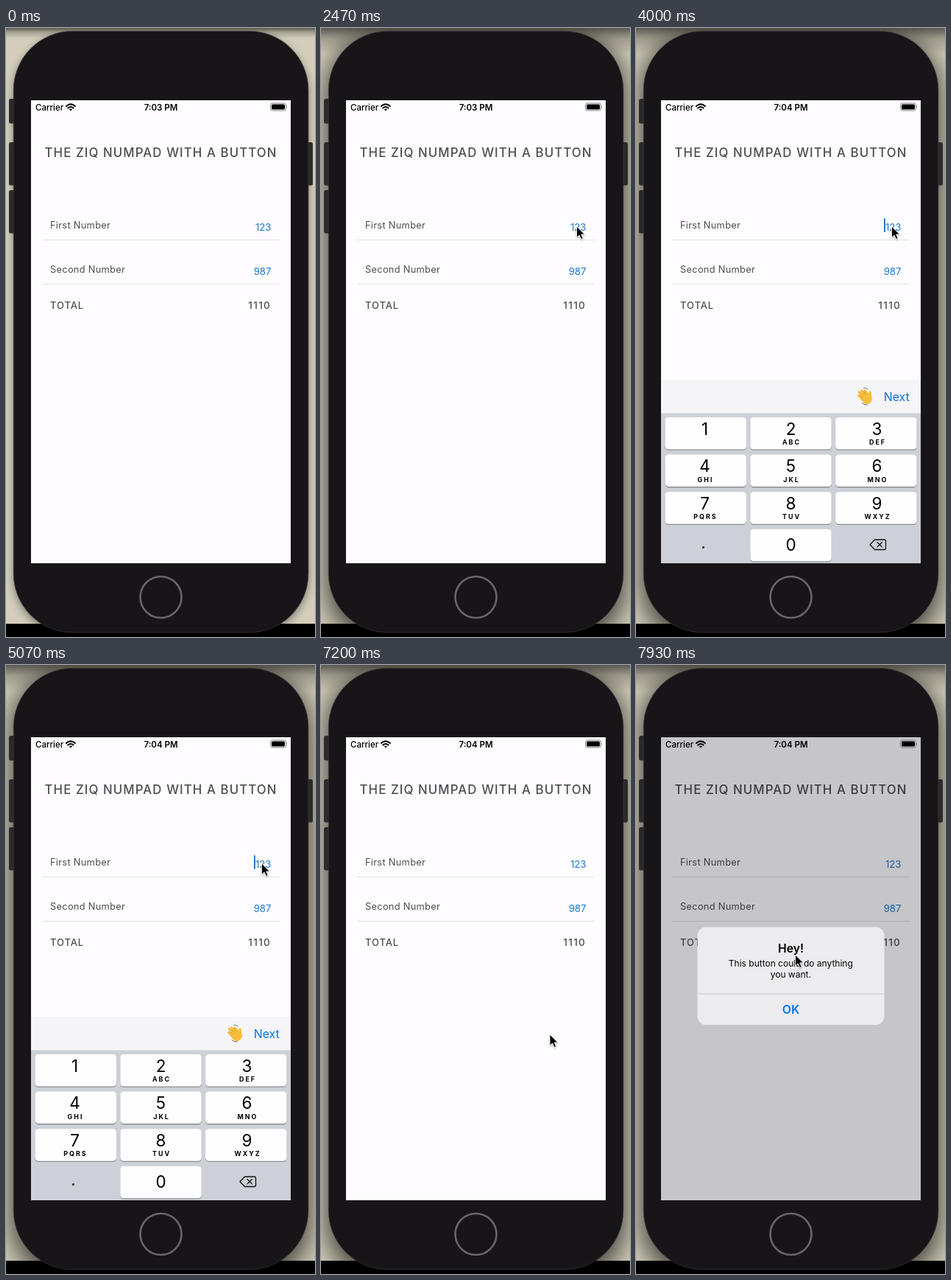
Write an HTML page that moves like this. It is 420 by 826 pixels and loops after 8000 ms.

```html
<!DOCTYPE html>
<html lang="en">
<head>
<meta charset="utf-8">
<title>Numpad with a button</title>
<style>
html, body { margin: 0; width: 100%; height: 100%; overflow: hidden; background: #000; }
svg { display: block; width: 100%; height: 100%; font-family: Inter, Roboto, sans-serif; }
.mid { text-anchor: middle; }
.ink { fill: #4f4d53; }
.link { fill: #1a78cf; font-size: 13.2px; }
.label { font-size: 12.8px; letter-spacing: .3px; }
.total { font-size: 13px; font-weight: 500; letter-spacing: .9px; }
.digit { font-size: 22.5px; }
.letters { font-size: 8.9px; font-weight: 700; letter-spacing: 2px; }
.line { fill: none; stroke-linecap: round; stroke-linejoin: round; }
</style>
</head>
<body>
<svg viewBox="0 0 420 826">
  <defs>
    <linearGradient id="topShade" x1="0" y1="0" x2="0" y2="1">
      <stop offset="0" stop-color="#34322e" stop-opacity=".75"/>
      <stop offset=".4" stop-color="#34322e" stop-opacity=".3"/>
      <stop offset="1" stop-color="#34322e" stop-opacity="0"/>
    </linearGradient>
    <filter id="soft" x="-20%" y="-20%" width="140%" height="140%"><feGaussianBlur stdDeviation="6"/></filter>
    <filter id="wide" x="-20%" y="-20%" width="140%" height="140%"><feGaussianBlur stdDeviation="17"/></filter>
    <filter id="pointerShade" x="-50%" y="-50%" width="200%" height="200%">
      <feDropShadow dx="0" dy="1" stdDeviation=".9" flood-opacity=".35"/>
    </filter>
    <clipPath id="desk"><rect width="420" height="808"/></clipPath>
    <clipPath id="screen"><rect x="34" y="98" width="353" height="628"/></clipPath>
  </defs>

  <rect width="420" height="826"/>
  <g clip-path="url(#desk)">
    <rect width="420" height="808" fill="#d3cebb"/>
    <rect id="idleShade" x="10" y="8" width="401" height="816" rx="80" opacity=".42" filter="url(#soft)"/>
    <rect id="activeShade" x="7" y="6" width="407" height="830" rx="80" opacity=".68" filter="url(#wide)"/>
    <rect id="topEdge" width="420" fill="url(#topShade)"/>
  </g>

  <g fill="#2a292c">
    <rect x="4" y="96" width="9" height="33.500" rx="2.500"/>
    <rect x="4" y="155" width="9" height="58.500" rx="2.500"/>
    <rect x="4" y="220" width="9" height="58.500" rx="2.500"/>
    <rect x="408" y="155" width="9" height="58.500" rx="2.500"/>
  </g>
  <rect x="10.300" y="4.300" width="400.600" height="815.600" rx="80" fill="#171518" stroke="#39383b" stroke-width=".7"/>
  <circle cx="210.500" cy="772" r="28" fill="#171518" stroke="#676669" stroke-width="2.600"/>

  <g clip-path="url(#screen)">
    <rect x="34" y="98" width="353" height="628" fill="#fefcff"/>
    <text class="ink" x="52.500" y="175" font-size="16.800" font-weight="500" letter-spacing="1.100">THE ZIQ NUMPAD WITH A BUTTON</text>
    <text class="ink label" x="60" y="272">First Number</text>
    <text class="ink label" x="60" y="332">Second Number</text>
    <text class="ink total" x="60" y="381">TOTAL</text>
    <text class="ink total" x="360.200" y="381" text-anchor="end" style="font-size:13.600px;letter-spacing:1.300px">1110</text>
    <text class="link" x="360.500" y="275" text-anchor="end">123</text>
    <text class="link" x="360.500" y="335" text-anchor="end">987</text>
    <path d="M49 287.500H372M49 347.500H372" stroke="#e2e0e6"/>
    <rect id="caret" x="337" y="258" width="1.800" height="19" rx=".8" fill="#2464bd"/>

    <g id="keyboard">
      <rect x="34" y="477" width="353" height="46" fill="#f5f4f7"/>
      <rect x="34" y="522.500" width="353" height="210" fill="#cdd0d7"/>
      <text x="336.700" y="506" font-size="15.900" fill="#0a74e4">Next</text>
      <g class="line" transform="translate(311 500.500) rotate(-42) scale(1.18)" stroke="#f7bd3c">
        <path d="M-4 2V-6M-1 0V-8.500M2 0V-8M4.700 2V-5.500" stroke-width="2.700"/>
        <path d="M-3.800 1H4.500V4Q4 7.500 0 7.500T-3.800 3Z" fill="#f7bd3c" stroke-width="3"/>
        <path d="M4.500 5L8 0" stroke-width="2.700"/>
        <path d="M-2.500-1V-5M.5-1V-6M3.400-1V-5" stroke="#c98722" stroke-width=".6"/>
        <path d="M6-8.500Q8.300-7 8.500-4.500M-7 3Q-6.500 6.500-4 8.500" stroke="#77808a" stroke-width=".9"/>
      </g>
      <g id="keys"></g>
      <text class="mid digit" x="91.500" y="706">.</text>
      <path class="line" d="M324.500 694H337.500Q339.500 694 339.500 696V705.500Q339.500 707.500 337.500 707.500H324.500L318 700.700ZM328 697.500L334.300 703.900M334.300 697.500L328 703.900" stroke="#111" stroke-width="1.300"/>
    </g>

    <rect id="dim" x="34" y="98" width="353" height="628"/>

    <text x="40" y="112" font-size="11.500" font-weight="500">Carrier</text>
    <text id="clock" class="mid" x="210.500" y="112" font-size="11.500" font-weight="600"></text>
    <path class="line" d="M81.900 106Q87.900 100.800 93.900 106M84.200 108.600Q87.900 105.500 91.600 108.600" stroke="#000" stroke-width="2" stroke-linecap="butt"/>
    <path d="M85.800 110.300Q87.900 108.700 90 110.300L87.900 112.500Z"/>
    <rect x="359.500" y="102" width="21" height="10" rx="2.800" fill="none" stroke="#77757a" stroke-width=".9"/>
    <rect x="361" y="103.500" width="18" height="7" rx="1.600"/>
    <path d="M381.600 105.300Q383 107 381.600 108.700Z" fill="#77757a"/>

    <g id="alert">
      <rect x="83.500" y="355.500" width="254" height="132.500" rx="11.500" fill="#edecef" fill-opacity=".985"/>
      <path d="M83.500 446H337.500" stroke="#c3c2c6" stroke-width=".9"/>
      <g class="mid">
        <text x="210.500" y="389.700" font-size="15.700" font-weight="600">Hey!</text>
        <text x="210.300" y="408.700" font-size="12">This button could do anything</text>
        <text x="210.300" y="423.500" font-size="12">you want.</text>
        <text x="210.500" y="473" font-size="16" font-weight="600" fill="#0a74e8">OK</text>
      </g>
    </g>
  </g>

  <path id="pointer" d="M0 0V15.200L3.500 12L6.100 17.600L8.700 16.400L6.200 11H11Z" stroke="#fff" stroke-width=".9" filter="url(#pointerShade)"/>
</svg>
<script>
const LOOP = 8000;
const FPS = 15;
const $ = id => document.getElementById(id);
const clamp = v => Math.min(1, Math.max(0, v));
const span = (t, from, to) => clamp((t - from) / (to - from));
const smooth = p => p * p * (3 - 2 * p);
const easeOut = p => 1 - (1 - p) ** 3;
const show = (id, on) => $(id).setAttribute('visibility', on ? 'visible' : 'hidden');

const letters = ['', 'ABC', 'DEF', 'GHI', 'JKL', 'MNO', 'PQRS', 'TUV', 'WXYZ'];

// Captions are spread a little wider than the keys they sit on.
function key(col, row, digit, caption) {
  const x = 39.5 + col * 115.8, y = 528 + row * 50.6, mid = 210.5 + (col - 1) * 117;
  return `<rect x="${x}" y="${y + 1}" width="110.4" height="43.8" rx="4.5" fill="#8b8d92"/>
    <rect x="${x}" y="${y}" width="110.4" height="43.5" rx="4.5" fill="#fefdff"/>
    <text class="mid digit" x="${mid}" y="${y + (caption === null ? 29.5 : 23.5)}">${digit}</text>
    <text class="mid letters" x="${mid + 1}" y="${y + 37}">${caption || ''}</text>`;
}

$('keys').innerHTML = letters.map((caption, i) => key(i % 3, Math.floor(i / 3), i + 1, caption)).join('')
  + key(1, 3, 0, null);

// Each visit of the pointer: [time, x, y] stops, hidden outside the visits.
const visits = [
  { until: 1130, stops: [[70, 128, 606], [130, 252, 420], [200, 322, 312], [260, 344, 277], [330, 349, 268],
    [870, 349, 268], [930, 347, 280], [1000, 315, 390], [1060, 234, 574]] },
  { until: LOOP, stops: [[1330, 261, 400], [1400, 306, 353], [1470, 324.5, 336.5], [1600, 324.5, 336.5],
    [2130, 347.5, 269], [5500, 347.5, 269], [6130, 328, 502], [6500, 311, 501], [7270, 311, 501], [7930, 216.5, 393]] }
];

function pointerAt(t) {
  const visit = visits.find(v => t >= v.stops[0][0] && t < v.until);
  if (!visit) return null;
  const { stops } = visit;
  const next = stops.findIndex(s => s[0] > t);
  if (next < 0) return stops[stops.length - 1].slice(1);
  const [t0, x0, y0] = stops[next - 1], [t1, x1, y1] = stops[next];
  const p = smooth(span(t, t0, t1));
  return [x0 + (x1 - x0) * p, y0 + (y1 - y0) * p];
}

function caretOpacity(t) {
  if (t < 3000 || t >= 6900) return 0;
  const phase = t % 1000;
  return phase < 800 ? 1 - span(phase, 450, 650) : span(phase, 800, 970);
}

function draw(t) {
  const active = t >= 2470;
  show('idleShade', !active);
  show('activeShade', active);
  $('topEdge').setAttribute('height', active ? 36 : 14);
  $('clock').textContent = t < 3400 ? '7:03 PM' : '7:04 PM';

  show('keyboard', t >= 3000 && t < 7200);
  const rise = 5 * (1 - span(t, 3000, 3130));
  const fall = 252 * smooth(span(t, 6870, 7150));
  $('keyboard').setAttribute('transform', `translate(0 ${rise + fall})`);
  $('caret').setAttribute('opacity', caretOpacity(t));

  const p = easeOut(span(t, 7200, 7600));
  const scale = 1.2 - .2 * p;
  $('dim').setAttribute('opacity', .22 * p);
  $('alert').setAttribute('opacity', clamp(p * 1.15));
  $('alert').setAttribute('transform', `translate(210.5 421.8) scale(${scale}) translate(-210.5 -421.8)`);

  const at = pointerAt(t);
  show('pointer', at);
  if (at) $('pointer').setAttribute('transform', `translate(${at})`);
}

const start = performance.now();
function tick() {
  const t = Math.max(0, performance.now() - start) % LOOP;
  const step = Math.floor((t + 4) * FPS / 1000);
  draw(Math.round(step * 100 / FPS) * 10 % LOOP);
  requestAnimationFrame(tick);
}
tick();
</script>
</body>
</html>
```
